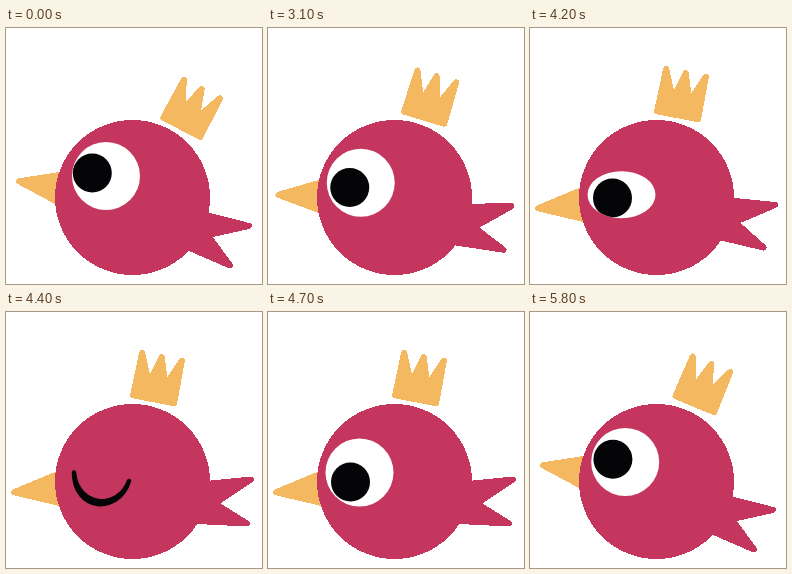
Write an HTML page that moves like this. It is 256 px wide and 256 px high and loops after 5900 ms.

```html
<!DOCTYPE html>
<html lang="en">
<head>
<meta charset="utf-8">
<title>Crowned bird</title>
<style>
  html, body { margin: 0; height: 100%; overflow: hidden; background: #fff; }
  svg { display: block; width: 100vw; height: 100vh; }
  .soft { stroke-width: 6; stroke-linejoin: round; }
  .gold { fill: #f4b860; stroke: #f4b860; }
  .red { fill: #c4365e; stroke: #c4365e; }
  .soft, #body { shape-rendering: crispEdges; }
</style>
</head>
<body>
<svg viewBox="0 0 256 256">
  <clipPath id="lids"><ellipse id="opening"/></clipPath>
  <polygon id="beak" class="soft gold"/>
  <polygon id="tail" class="soft red"/>
  <circle id="body" cx="126.5" cy="169.5" r="77.5" fill="#c4365e"/>
  <polygon id="crown" class="soft gold"
    points="-20.8,-2.6 -20,-45.8 -7.5,-17.5 0,-45.8 9,-18 20.5,-45.8 21,-2.6"/>
  <g id="openEye">
    <ellipse id="white" fill="#fff"/>
    <circle id="pupil" r="19.5" fill="#050507" clip-path="url(#lids)"/>
  </g>
  <path id="closedEye" d="M68 160.5C68 199 112 203 123 169C112 199 71 195 68 160.5Z"
    fill="#050507" stroke="#050507" stroke-width="4.5" stroke-linejoin="round"/>
</svg>
<script>
const LOOP = 5900;
const el = id => document.getElementById(id);

const mix = (a, b, k) => {
  if (typeof a === 'number') return a + (b - a) * k;
  const out = Array.isArray(a) ? [] : {};
  for (const key in a) out[key] = mix(a[key], b[key], k);
  return out;
};

// crown: x, y, angle; eye: cx, cy, ry; beak and tail: outlines
const up = {
  crown: [174.5, 101.6, 27.5],
  eye: [100, 148, 34],
  pupil: [86.3, 145],
  beak: [13, 153.3, 60, 146, 60, 178.5],
  tail: [190, 184.5, 243, 198, 201.8, 207.1, 224, 237.5, 170, 214]
};
const down = {
  crown: [147, 89.8, 11],
  eye: [91.5, 160.5, 34],
  pupil: [82.5, 170],
  beak: [8, 180.3, 60, 158.6, 60, 192.5],
  tail: [190, 173, 245, 167.5, 209, 191.5, 241, 211.5, 170, 208]
};
const turning = {
  ...up,
  crown: [163.7, 94.5, 22.5],
  eye: [94, 149, 34],
  pupil: [81, 149],
  tail: [190, 184.5, 242, 189, 203, 207, 230, 232, 170, 215.5]
};
const returning = { ...up, crown: turning.crown, eye: [95.2, 150, 34], pupil: [82.9, 147.3] };

const wag = [190, 171.5, 245, 177, 205, 194, 233.5, 219.5, 170, 204.5];
const half = { ...down, eye: [91.5, 166.7, 23.5], tail: wag };
const slit = { ...down, eye: [92, 173, 12], tail: mix(wag, down.tail, 0.5) };
const shut = { ...down, closed: true };

const steps = [
  [0, up],
  [3000, turning], [3100, mix(turning, down, 0.5)], [3200, down],
  [4200, half], [4300, slit], [4400, shut], [4500, slit], [4600, half], [4700, down],
  [5700, mix(down, returning, 0.5)], [5800, returning]
];

function setEllipse(node, [cx, cy, ry]) {
  for (const [name, value] of Object.entries({ cx, cy, rx: 34, ry })) node.setAttribute(name, value);
}

function draw(time) {
  const pose = steps.filter(([start]) => start <= time).pop()[1];
  const [x, y, angle] = pose.crown;
  el('crown').setAttribute('transform', `translate(${x} ${y}) rotate(${angle})`);
  for (const part of ['beak', 'tail']) el(part).setAttribute('points', pose[part].join(' '));
  for (const part of ['white', 'opening']) setEllipse(el(part), pose.eye);
  el('pupil').setAttribute('cx', pose.pupil[0]);
  el('pupil').setAttribute('cy', pose.pupil[1]);
  el('openEye').style.display = pose.closed ? 'none' : '';
  el('closedEye').style.display = pose.closed ? '' : 'none';
}

const begin = performance.now();
function tick() {
  draw((performance.now() - begin) % LOOP);
  requestAnimationFrame(tick);
}
tick();
</script>
</body>
</html>
```
